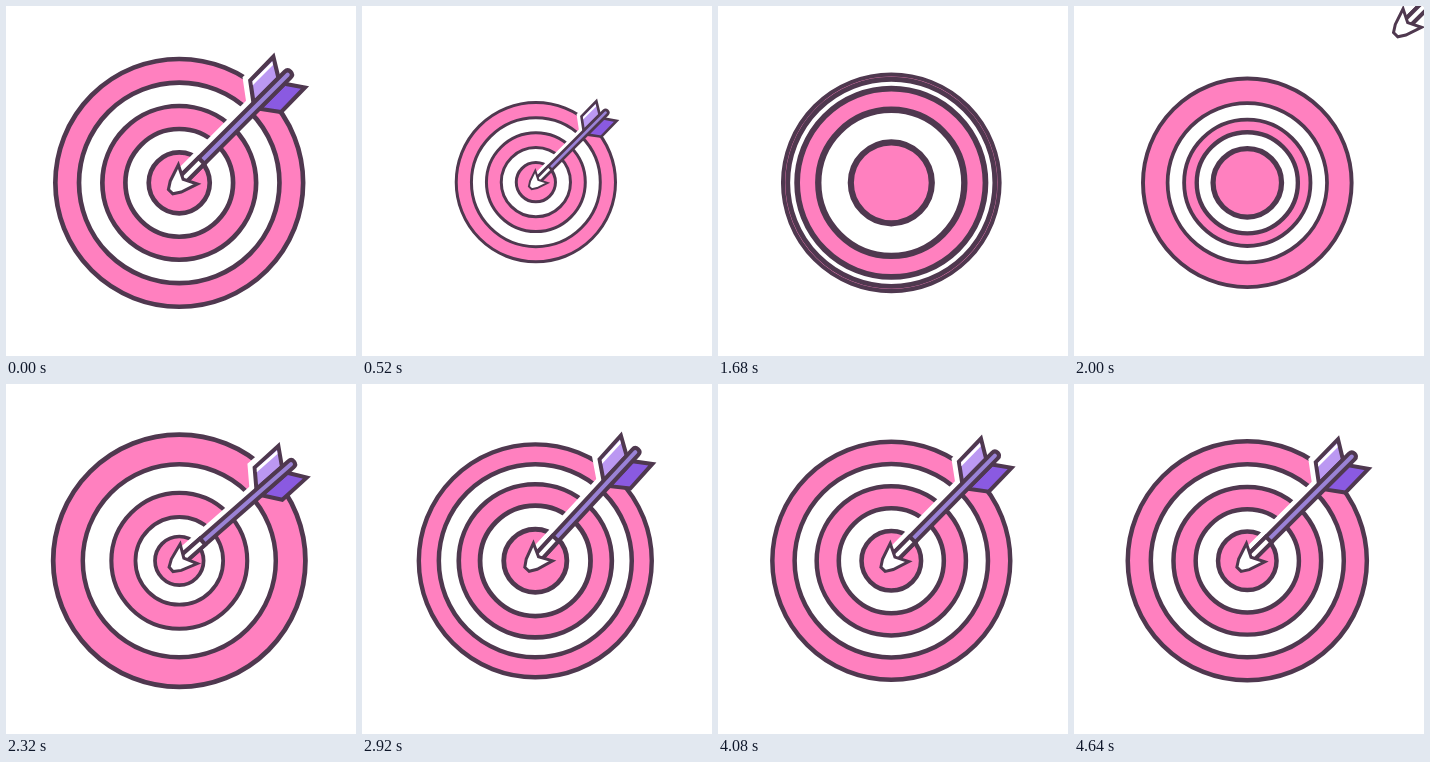
These frames come from a looping animation (350 px wide and 350 px high, 4680 ms). An HTML page:

```html
<!DOCTYPE html>
<html>
<head>
<meta charset="utf-8">
<title>Target and arrow</title>
<style>
  html, body { margin: 0; width: 100%; height: 100%; overflow: hidden; background: #fff; }
  svg { display: block; width: 100vw; height: 100vh; }
</style>
</head>
<body>
<svg viewBox="0 0 350 350">
  <g id="scene">
    <g id="rings" stroke="#4f384f"></g>
    <!-- Arrow drawn along +x from its tip, then turned to point down-left -->
    <g id="arrow" stroke="#4f384f" stroke-width="4">
      <g transform="rotate(-45)">
        <g fill="#fff" stroke="#fff" transform="translate(-2 -5.5)">
          <path d="M27 -3H160V3H27Z"/>
          <path d="M118 -4L131 -21.500L163 -21.500L152 -4Z"/>
        </g>
        <path d="M118 4L130.500 21L163.500 20.500L152 4Z" fill="#8a5ae1"/>
        <path d="M118 -4L131 -21.500L163 -22L152 -4Z" fill="#bb98f2"/>
        <path d="M129.500 -16.500L132 -19.500H159L157 -16.500Z" fill="#fff" stroke="none"/>
        <path d="M16 -4H160.500Q164.500 -4 164.500 0Q164.500 4 160.500 4H16Z" fill="#9a82d6"/>
        <path d="M16 -4H43V4H16Z" fill="#fff"/>
        <path d="M1 -3L8 -7.500L24.500 -13L18 0L24.500 13L8 7.500L1 3Z" fill="#fff" stroke-width="3"/>
      </g>
    </g>
  </g>
</svg>
<script>
  const LOOP = 4680, MID = 175, CX = 173.3, CY = 176.8, TIP_X = 164.3, TIP_Y = 186;
  const RADII = [119.4, 96.6, 74.1, 51.9, 29.4];
  const SHRINK_START = -205, SHRINK_TIME = 917, SHRINK_END = 700;
  const RING_START = 664, STAGGER = 126;
  const FLY_START = 1840, HIT = 2140;

  const scene = document.getElementById('scene');
  const arrow = document.getElementById('arrow');
  const holder = document.getElementById('rings');
  const rings = RADII.map((r, i) => {
    const c = document.createElementNS('http://www.w3.org/2000/svg', 'circle');
    c.setAttribute('cx', CX);
    c.setAttribute('cy', CY);
    c.setAttribute('fill', i % 2 ? '#fff' : '#ff80bf');
    return holder.appendChild(c);
  });

  // Step response of a damped spring, from 0 to 1
  function spring(ms) {
    if (ms <= 0) return 0;
    const a = 0.276, q = ms * 0.0053;
    return 1 - Math.exp(-a * q) * (Math.cos(q) + a * Math.sin(q));
  }

  // Swells a little, then drops to 0
  function shrink(t) {
    const u = (t - SHRINK_START) / SHRINK_TIME, c = 1.25;
    return Math.max(0, 1 - (c + 1) * u * u * u + c * u * u);
  }

  function wobble(ms) {
    return 5.4 * Math.exp(-0.0007 * ms) * Math.sin(Math.PI * ms / 625);
  }

  function draw(t) {
    const leaving = t < SHRINK_END;
    const k = leaving ? shrink(t) : 1;
    scene.setAttribute('transform', `translate(${MID} ${MID}) scale(${k}) translate(${-MID} ${-MID})`);

    rings.forEach((c, i) => {
      const s = leaving ? 1 : spring(t - RING_START - i * STAGGER);
      c.setAttribute('r', RADII[i] * s);
      c.setAttribute('stroke-width', 4.5 * s);
    });

    const shown = leaving || t >= FLY_START;
    arrow.setAttribute('display', shown ? 'inline' : 'none');
    let away = 0, turn = 0;
    if (!leaving && t < HIT) {
      const u = Math.max(0, (t - FLY_START) / (HIT - FLY_START));
      away = 220 * (1 - u * u);
    } else if (!leaving) {
      turn = wobble(t - HIT);
    }
    arrow.setAttribute('transform', `translate(${TIP_X + away} ${TIP_Y - away}) rotate(${turn})`);
  }

  function tick() {
    draw(performance.now() % LOOP);
    requestAnimationFrame(tick);
  }
  tick();
</script>
</body>
</html>
```
